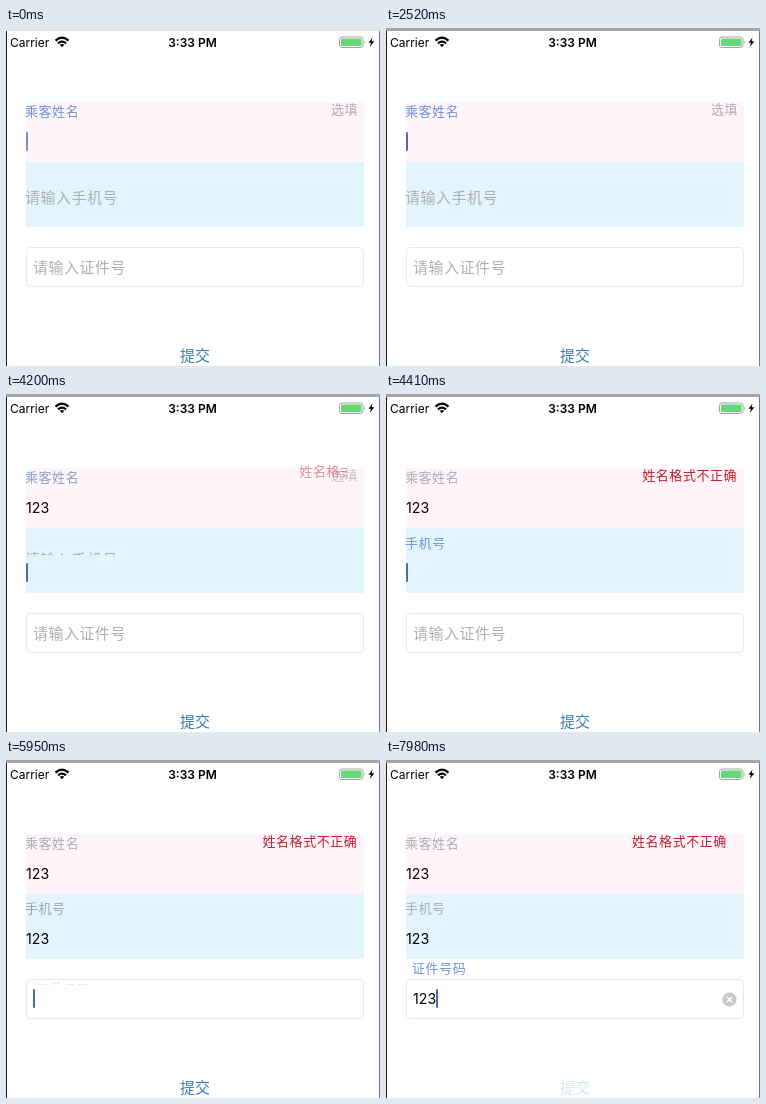
An HTML page for the animation above (8 s loop, 374x338 px).

```html
<!DOCTYPE html>
<html lang="zh-CN">
<head>
<meta charset="utf-8">
<style>
html, body { margin: 0; width: 100%; height: 100%; overflow: hidden; background: #fff; }
svg { display: block; }
text { font-family: "Noto Sans CJK SC", "Noto Sans CJK", sans-serif; }
.latin { font-family: Inter, Roboto, sans-serif; }
.small { font-size: 13px; letter-spacing: .55px; }
.hint { font-size: 15px; letter-spacing: .5px; fill: #acafb3; }
</style>
</head>
<body>
<svg width="374" height="338" viewBox="0 0 374 338">
  <rect width="374" height="338" fill="#fff"/>
  <rect id="topStrip" width="374" height="3"/>
  <path d="M.5 3V338" stroke="#1c1c1e"/>
  <path d="M373.5 3V338" stroke="#77777a"/>

  <g font-size="12">
    <text class="latin" x="4" y="18.5">Carrier</text>
    <text class="latin" x="186.5" y="18.5" text-anchor="middle" font-weight="600">3:33 PM</text>
  </g>
  <g fill="none" stroke="#000" stroke-width="2.2">
    <path d="M49.5 12.6Q56 6.8 62.5 12.6M52 15.3Q56 11.8 60 15.3"/>
    <path d="M53.8 16.8Q56 15 58.2 16.8L56 19.2Z" fill="#000" stroke="none"/>
  </g>
  <rect x="333.5" y="9" width="23.5" height="10.5" rx="2.5" fill="none" stroke="#a2a2a5"/>
  <rect x="335" y="10.5" width="20.5" height="7.5" rx="1" fill="#66d877"/>
  <path d="M358.2 12.5Q360 14.2 358.2 16Z" fill="#a2a2a5"/>
  <path d="M366.5 9.5L362.5 14.8H365L363.8 19L368.3 13.3H365.6Z"/>

  <rect x="20" y="74" width="338" height="60" fill="#fff4fa"/>
  <rect x="20" y="134" width="338" height="65" fill="#e4f4fc"/>
  <rect id="seam" x="20" y="133" width="338" height="1" fill="#fff"/>
  <rect x="20.5" y="219.5" width="337" height="39" rx="4" fill="#fff" stroke="#e8e8ea"/>
  <g id="live"></g>
  <text id="submit" x="174" y="332.5" font-size="15" fill="#3b7cb3">提交</text>
</svg>
<script>
const LOOP = 8000;
const GRAY = [172, 173, 178], BLUE = [112, 148, 208];
const ERROR_AT = 4130, SUBMIT_AT = 7910;

// x, y: left edge and middle of the value; typed: times of the key presses
const fields = [
  { x: 20, y: 113.5, from: -1200, to: 3990, typed: [3150, 3290, 3430], back: '#fff4fa', clear: '#c6c1c8',
    label: '乘客姓名', labelX: 19, labelY: 83.5, rise: -1000 },
  { x: 20, y: 178.5, from: 3990, to: 5670, typed: [4760, 4830, 5040], back: '#e4f4fc', clear: '#b5c3cc',
    label: '手机号', labelX: 19, labelY: 148.5, rise: 4130,
    hint: '请输入手机号', hintX: 19, hintY: 169.5, slack: 6.6, swap: .5 },
  { x: 27, y: 238.5, from: 5670, to: LOOP + 1, typed: [6300, 6370, 6510], back: '#fff', clear: '#c8c8cd',
    label: '证件号码', labelX: 26, labelY: 208.5, rise: 5838,
    hint: '请输入证件号', hintX: 27, hintY: 239.5, slack: 13, swap: 0 },
];
const caretOffsets = [0, 8, 15.5, 23];
const activity = [2520, ...fields.flatMap(f => [f.from, ...f.typed])];

const clamp = v => Math.min(1, Math.max(0, v));
const ramp = (t, start, length) => clamp((t - start) / length);
const smooth = p => p * p * (3 - 2 * p);
const mix = (a, b, p) => a + (b - a) * p;
const blend = (a, b, p) => `rgb(${a.map((v, i) => Math.round(mix(v, b[i], p)))})`;

function text(cls, x, middle, size, content, fill, opacity = 1) {
  const paint = fill ? `fill="${fill}"` : '';
  return `<text class="${cls}" x="${x}" y="${middle + size * .38}" ${paint} opacity="${opacity}">${content}</text>`;
}

function crop(x, y, width, height, content) {
  return `<svg x="${x}" y="${y}" width="${width}" height="${height}"
    viewBox="${x} ${y} ${width} ${height}" overflow="hidden">${content}</svg>`;
}

function caretOpacity(t) {
  const last = Math.max(...activity.filter(a => a <= t));
  const q = t - last - 150;
  if (q < 0) return 1;
  const m = q % 1050;
  if (m >= 450) return clamp(Math.max(1 - (m - 450) / 250, (m - 985) / 90));
  return q < 1050 ? 1 : clamp((m + 65) / 90);
}

function drawLabel(f, t) {
  if (t < f.rise) return text('hint', f.hintX, f.hintY, 15, f.hint);
  const p = smooth(ramp(t, f.rise, 300));
  const color = blend(BLUE, GRAY, ramp(t, f.to + 40, 330));
  if (p === 1) return text('small', f.labelX, f.labelY, 13, f.label, color);
  const y = mix(f.hintY - 1, f.labelY, p);
  const bottom = f.labelY + 7 + f.slack * (1 - p);
  const content = p < f.swap
    ? text('hint', f.hintX, y, 15, f.hint)
    : text('small', mix(f.hintX + 6, f.labelX, p), y, 13, f.label, blend(GRAY, BLUE, p));
  return crop(0, f.labelY - 10, 200, bottom - f.labelY + 10, content);
}

function drawField(f, t) {
  const count = f.typed.filter(k => k <= t).length;
  const focused = t >= f.from && t < f.to;
  let out = drawLabel(f, t);
  if (count) out += `<text class="latin" x="${f.x}" y="${f.y + 5.3}" font-size="14.2">${'123'.slice(0, count)}</text>`;
  if (focused) {
    out += `<rect x="${f.x + caretOffsets[count]}" y="${f.y - 9.5}" width="2" height="19" rx="1"
      fill="#4f6cae" opacity="${caretOpacity(t)}"/>`;
    if (count) out += `<circle cx="343.5" cy="${f.y + 1}" r="7" fill="${f.clear}"/>
      <path d="M340.7 ${f.y - 1.8}l5.6 5.6m0 -5.6l-5.6 5.6" stroke="${f.back}" stroke-width="1.5"/>`;
  }
  return out;
}

function shake(t, start) {
  const p = t - start;
  return p > 0 && p < 560 ? -10.5 * Math.sin(p / 280 * 2 * Math.PI) : 0;
}

function drawNote(t) {
  const p = ramp(t, ERROR_AT, 230);
  let out = p < 1 ? text('small', 325, 81.3, 13, '选填', '#acadb2', 1 - p) : '';
  if (p > 0) {
    const left = mix(325, 256.5, p) + shake(t, ERROR_AT) + shake(t, SUBMIT_AT);
    const y = 81 - 6 * (1 - p);
    out += crop(left, 60, mix(26, 97, p), 40, text('small', left, y, 13, '姓名格式不正确', '#bd1f2a', mix(.25, 1, p)));
  }
  return out;
}

const byId = id => document.getElementById(id);
const live = byId('live'), submit = byId('submit'), topStrip = byId('topStrip'), seam = byId('seam');

function render(now) {
  const t = now % LOOP;
  const early = t < 2520;
  topStrip.setAttribute('fill', early ? '#e6e5e6' : '#a7a4a7');
  seam.setAttribute('opacity', early ? 1 : 0);
  submit.setAttribute('opacity', t >= SUBMIT_AT ? .2 : 1);
  live.innerHTML = fields.map(f => drawField(f, t)).join('') + drawNote(t);
}

const startTime = performance.now();
function tick() {
  render(performance.now() - startTime);
  requestAnimationFrame(tick);
}
tick();
</script>
</body>
</html>
```
